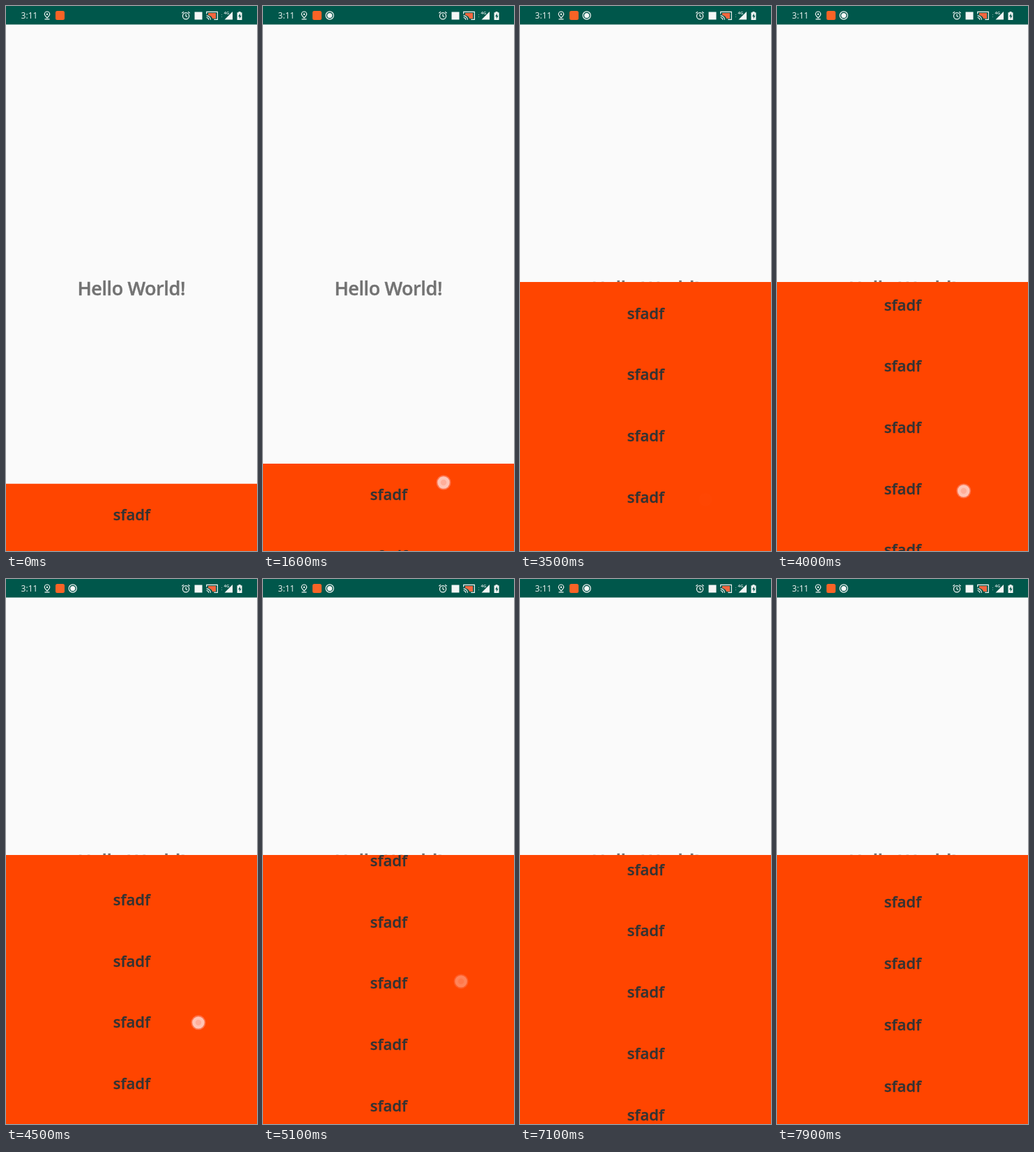
An HTML page for the animation above (8 s loop, 360 by 780 pixels).

```html
<!DOCTYPE html>
<html lang="en">
<head>
<meta charset="utf-8">
<style>
  html, body { margin: 0; width: 100%; height: 100%; overflow: hidden; background: #fafafa; }
  svg { display: block; }
  text { font-family: "Open Sans", "Noto Sans", sans-serif; font-weight: 600; text-anchor: middle; }
  .hello { font-size: 27px; letter-spacing: -.4px; fill: #727272; stroke: #727272; stroke-width: .4; }
  .item { font-size: 22px; fill: #333; stroke: #333; stroke-width: .3; }
  .clock { font-size: 12px; font-weight: 400; }
  .line { fill: none; stroke: #f4f6f5; stroke-width: 1.2; }
</style>
</head>
<body>
<svg width="360" height="780" viewBox="0 0 360 780">
  <rect width="360" height="780" fill="#fafafa"/>
  <text class="hello" x="179.7" y="414">Hello World!</text>

  <svg id="panel" width="360" height="780" overflow="hidden">
    <rect width="360" height="780" fill="#ff4500"/>
    <g id="list"></g>
  </svg>

  <g id="touch">
    <circle r="10.5" fill="#ff8a70" opacity=".65"/>
    <circle r="8.7" fill="#ffc4b6"/>
    <circle r="4.2" fill="#ffae9a"/>
  </g>

  <!-- status bar -->
  <rect width="360" height="26.5" fill="#00574b"/>
  <g fill="#f4f6f5">
    <text class="clock" x="33.5" y="18">3:11</text>
    <path class="line" d="M59 17c-2.5-2.5-3.7-4-3.7-5.3a3.7 3.7 0 0 1 7.4 0c0 1.3-1.2 2.8-3.7 5.3zM55.5 18.8h7"/>
    <circle cx="59" cy="11.7" r="1.2"/>
    <rect x="71" y="7" width="13" height="13" rx="2.5" fill="#fa6326"/>
    <g id="record">
      <circle class="line" cx="95.7" cy="13.5" r="5.6"/>
      <circle cx="95.7" cy="13.5" r="3.6"/>
    </g>
    <g class="line">
      <circle cx="258" cy="14.3" r="4.6"/>
      <path d="M258 11.5v3l2 1.3M252.3 10.3l2.6-2.2M263.7 10.3l-2.6-2.2"/>
    </g>
    <rect x="270.5" y="8.5" width="11" height="11"/>
    <path d="M290 10h11v8h-5q-1-4-6-5z" fill="#f2663f"/>
    <path class="line" d="M287.7 11.5V8.3h15.6v11h-5M287.5 13.8a6 6 0 0 1 6 6M287.5 16.5a3.3 3.3 0 0 1 3.3 3.3"/>
    <path d="M325 8v11.5h-11.5z"/>
    <text x="316.5" y="12" font-size="6">4G</text>
    <path d="M309 12h1v1h-1zM309 15h1v1h-1z" opacity=".5"/>
    <path d="M333.5 8h3v1.2h2V20h-7V9.2h2z"/>
    <path d="M335.7 10.5l-2.5 4.5h1.7v3.5l2.5-4.8h-1.7z" fill="#00574b"/>
  </g>
</svg>
<script>
const $ = id => document.getElementById(id);
const PITCH = 87.7, LOOP = 8000;

for (let i = 0; i < 9; i++)
  $('list').innerHTML += `<text class="item" x="180.3" y="${52.5 + i * PITCH}">sfadf</text>`;

const ramp = (t, from, to) => Math.min(1, Math.max(0, (t - from) / (to - from)));
const ease = (t, from, to) => {
  const p = ramp(t, from, to);
  return p * p * (3 - 2 * p);
};

// The panel is pulled up slowly, then flicked open.
const panelY = t => 683.5 - 28.5 * ramp(t, 1200, 1600) ** 2 - 260 * ease(t, 1600, 1950);

// The list is dragged up once, then back down in two moves.
const scrollY = t => 126 * ease(t, 3720, 5200) - 14.6 * ease(t, 5900, 7100) - 46.7 * ease(t, 7100, 7900);

// The finger follows whatever it drags.
const touches = [
  { from: 1100, to: 1900, x: () => 259, y: t => panelY(t) + 27 },
  { from: 3500, to: 5000, x: t => 266 + .145 * scrollY(t), y: t => 706.5 - 1.05 * scrollY(t) },
  { from: 5800, to: 6900, x: () => 283, y: t => 710 - scrollY(t) },
  { from: 7200, to: 7650, x: () => 279, y: t => 710 - scrollY(t) }
];

function draw(now) {
  const t = now % LOOP;
  $('panel').setAttribute('y', panelY(t));
  $('list').setAttribute('transform', `translate(0 ${-scrollY(t)})`);
  $('record').setAttribute('opacity', ramp(t, 50, 350));

  const touch = touches.find(p => t >= p.from && t < p.to + 200);
  $('touch').setAttribute('visibility', touch ? 'visible' : 'hidden');
  if (touch) {
    const { from, to, x, y } = touch;
    $('touch').setAttribute('transform', `translate(${x(t)} ${y(t)})`);
    $('touch').setAttribute('opacity', ramp(t, from, from + 100) - ramp(t, to, to + 200));
  }
  requestAnimationFrame(() => draw(performance.now()));
}
draw(0);
</script>
</body>
</html>
```
